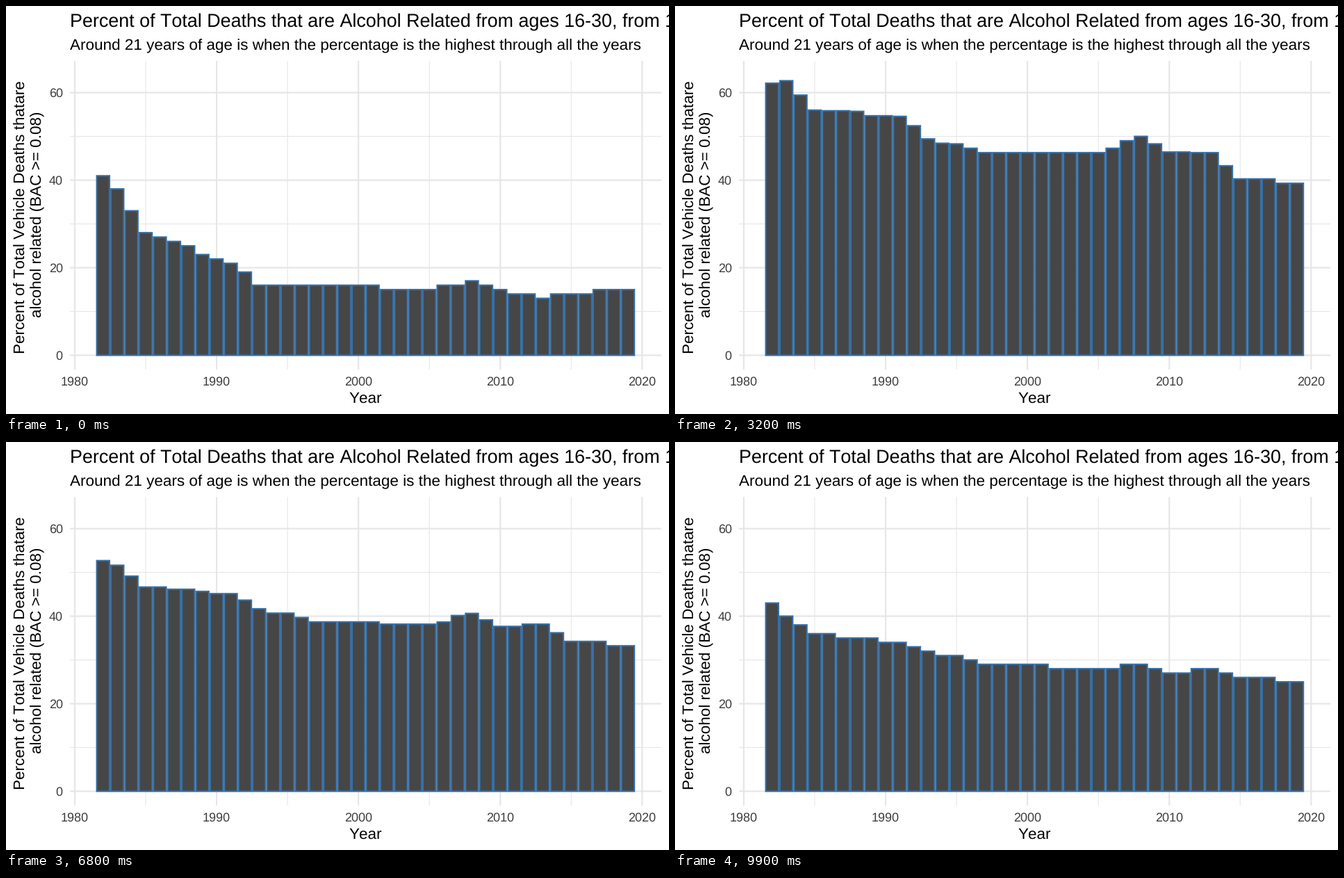
Recreate the animation shown at these times as a matplotlib script. Size 954 by 587 pixels, loop 10 s.

```python
import numpy as np
import matplotlib.pyplot as plt
from matplotlib.animation import FuncAnimation

W, H, DPI = 954, 587, 64
FRAMES, INTERVAL = 100, 100
PT = 72 / DPI  # points per pixel

plt.rcParams.update({
    "font.family": "Liberation Sans",
    "text.hinting": "none",
    "text.kerning_factor": 6,  # plain advances, no kerning
})

FILL, EDGE, GRID, TICK = "#464646", "#366fa5", "#e6e6e6", "#3c3c3c"
BODY = 22.45
TITLE, SMALL = 1.2 * BODY, 0.8 * BODY
LEFT, RIGHT, TOP, BOTTOM = 91.9, 942.8, 79.3, 522.65
YEARS = np.arange(1982, 2020)
AGES = np.array([16, 18, 21, 30])

# Turning points of the trend: percent at each of the four ages
TREND = {
    1982: (41, 57, 63, 43),
    1983: (38, 55, 64, 40),
    1985: (28, 44, 58, 36),
    1991: (21, 40, 57, 34),
    1993: (16, 34, 52, 32),
    1997: (16, 30, 49, 29),
    2005: (15, 30, 49, 28),
    2008: (17, 32, 53, 29),
    2010: (15, 31, 49, 27),
    2013: (13, 30, 49, 28),
    2015: (14, 24, 43, 26),
    2019: (15, 23, 42, 25),
}


def whole_percent(points):
    return np.floor(np.interp(YEARS, list(TREND), points) + 0.5)


LEVELS = np.array([whole_percent(points) for points in zip(*TREND.values())])
KEYS = np.round((AGES - AGES[0]) / np.ptp(AGES) * (FRAMES - 1))

# Axis limits: 5 % padding around the bars
PAD_X, PAD_Y = 0.05 * (len(YEARS) - 0.1), 0.05 * LEVELS.max()
X0, X1 = YEARS[0] - 0.45 - PAD_X, YEARS[-1] + 0.45 + PAD_X
Y0, Y1 = -PAD_Y, LEVELS.max() + PAD_Y


def heights(i):
    return [np.interp(i, KEYS, col) for col in LEVELS.T]


fig = plt.figure(figsize=(W / DPI, H / DPI), dpi=DPI, facecolor="white")
ax = fig.add_axes([LEFT / W, 1 - BOTTOM / H, (RIGHT - LEFT) / W, (BOTTOM - TOP) / H])
ax.set_axis_off()


def label(x, y, s, size, color="black", **kw):
    fig.text(x / W, 1 - y / H, s, fontsize=size * PT, color=color,
             va="baseline", **kw)


def px(year):
    return LEFT + (year - X0) / (X1 - X0) * (RIGHT - LEFT)


def py(value):
    return BOTTOM - (value - Y0) / (Y1 - Y0) * (BOTTOM - TOP)


def grid(years, values, width):
    style = dict(color=GRID, lw=width * PT, snap=False, zorder=width)
    for v in values:
        ax.axhline(v, **style)
    for yr in years:
        ax.axvline(yr, **style)


grid(range(1985, 2020, 10), range(10, 60, 20), 1.08)
grid(range(1980, 2021, 10), range(0, 61, 20), 2.15)

bars = ax.bar(YEARS, heights(0), width=0.9, color=FILL, edgecolor=EDGE,
              linewidth=2.15 * PT, snap=False, zorder=3)
ax.set_xlim(X0, X1)
ax.set_ylim(Y0, Y1)

label(LEFT, 30.5, "Percent of Total Deaths that are Alcohol Related "
      "from ages 16-30, from 1982-2019", TITLE)
label(LEFT, 63.5, "Around 21 years of age is when the percentage is "
      "the highest through all the years", BODY)
label((LEFT + RIGHT) / 2, 571.1, "Year", BODY, ha="center")

side = dict(rotation=90, rotation_mode="anchor", ha="left")
label(27.3, 499.7, "Percent of Total Vehicle Deaths thatare", BODY, **side)
label(51.5, 448.5, "alcohol related (BAC >= 0.08)", BODY, **side)

for yr in range(1980, 2021, 10):
    label(px(yr), 545.5, str(yr), SMALL, TICK, ha="center")
for v in range(0, 61, 20):
    label(81.8, py(v) + 6.4, str(v), SMALL, TICK, ha="right")


def update(i):
    for bar, h in zip(bars, heights(i)):
        bar.set_height(h)
    return list(bars)


anim = FuncAnimation(fig, update, frames=FRAMES, interval=INTERVAL,
                     repeat=True, repeat_delay=0, blit=False)
plt.show()
```
